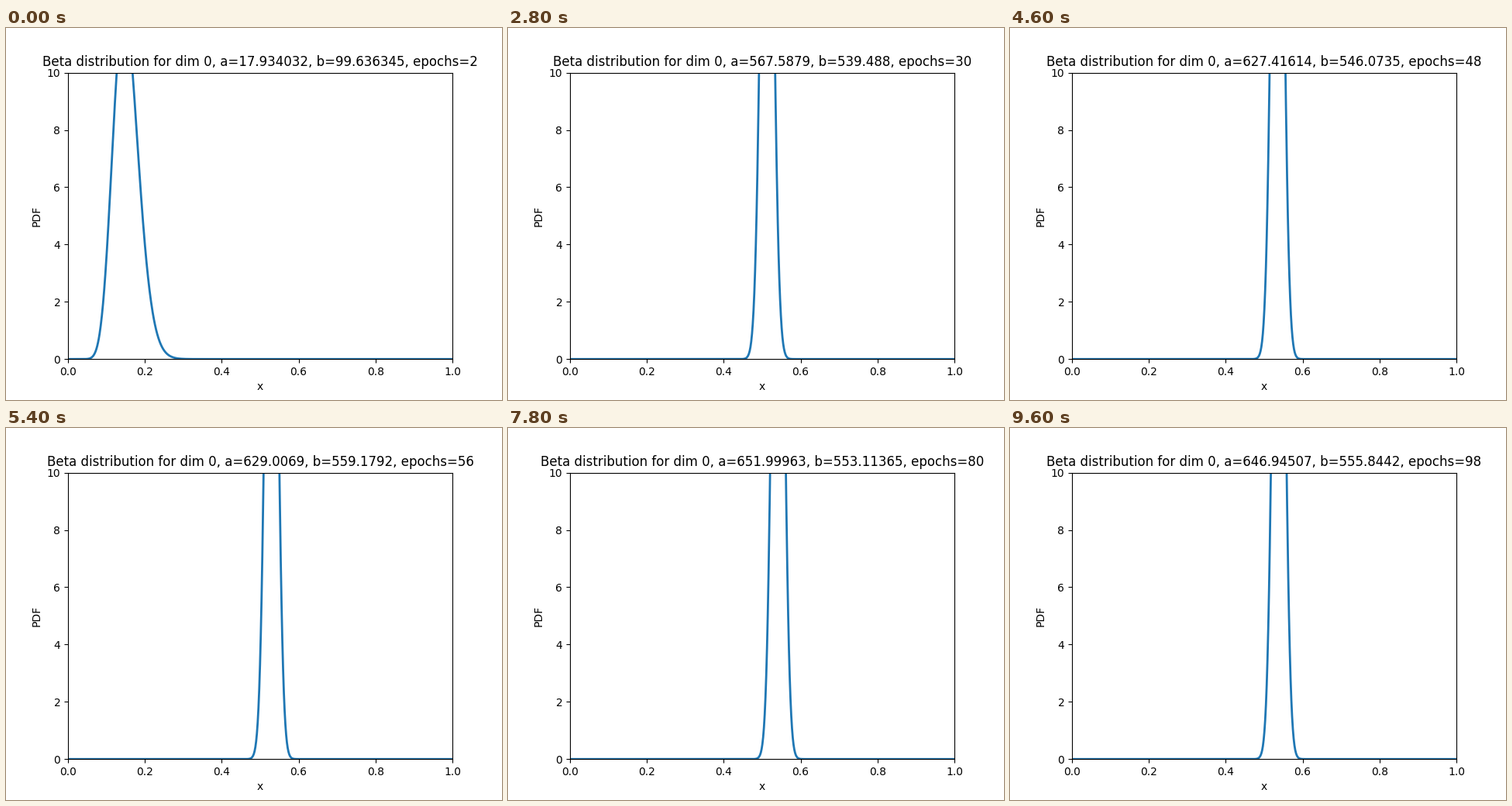
These frames come from a looping animation (640x480 px, 9.8 s). A matplotlib script:

```python
from math import lgamma

import matplotlib.pyplot as plt
import numpy as np
from matplotlib.animation import FuncAnimation

FRAMES, INTERVAL = 49, 200

# Fitted beta parameters at a few epochs; the rest follow a monotone cubic.
EPOCHS = np.array([2, 14, 30, 40, 56, 80, 98], float)
A = np.array([17.934032, 327.31317, 567.5879, 625.3501,
              629.0069, 651.99963, 646.94507])
B = np.array([99.636345, 392.65573, 539.488, 532.96783,
              559.1792, 553.11365, 555.8442])


def knot_slopes(x, y):
    h = np.diff(x)
    d = np.diff(y) / h
    m = np.zeros_like(y)
    for k in range(1, len(y) - 1):
        if d[k - 1] * d[k] > 0:
            w1, w2 = 2 * h[k] + h[k - 1], h[k] + 2 * h[k - 1]
            m[k] = (w1 + w2) / (w1 / d[k - 1] + w2 / d[k])
    m[0] = ((2 * h[0] + h[1]) * d[0] - h[0] * d[1]) / (h[0] + h[1])
    m[-1] = d[-1]
    return m


def interpolate(x, y, t):
    m = knot_slopes(x, y)
    k = min(np.searchsorted(x, t, side="right") - 1, len(x) - 2)
    h = x[k + 1] - x[k]
    s = (t - x[k]) / h
    blend = s * s * (3 - 2 * s)
    return (y[k] * (1 - blend) + y[k + 1] * blend
            + h * s * (1 - s) * ((1 - s) * m[k] - s * m[k + 1]))


def beta_pdf(x, a, b):
    inner = np.clip(x, 1e-12, 1 - 1e-12)
    log_norm = lgamma(a + b) - lgamma(a) - lgamma(b)
    return np.exp(log_norm + (a - 1) * np.log(inner)
                  + (b - 1) * np.log1p(-inner))


fig, ax = plt.subplots(figsize=(6.4, 4.8), dpi=100)
xs = np.linspace(0, 1, 1000)
line, = ax.plot([], [], lw=2, color="#1f77b4")
ax.set(xlim=(0, 1), ylim=(0, 10), xlabel="x", ylabel="PDF")
title = ax.set_title("")


def update(i):
    epoch = 2 * (i + 1)
    a = interpolate(EPOCHS, A, epoch)
    b = interpolate(EPOCHS, B, epoch)
    line.set_data(xs, beta_pdf(xs, a, b))
    title.set_text(f"Beta distribution for dim 0, a={str(np.float32(a))}, "
                   f"b={str(np.float32(b))}, epochs={epoch}")
    return line, title


anim = FuncAnimation(fig, update, frames=FRAMES, interval=INTERVAL,
                     init_func=lambda: update(0), repeat=True, repeat_delay=0)
plt.show()
```
